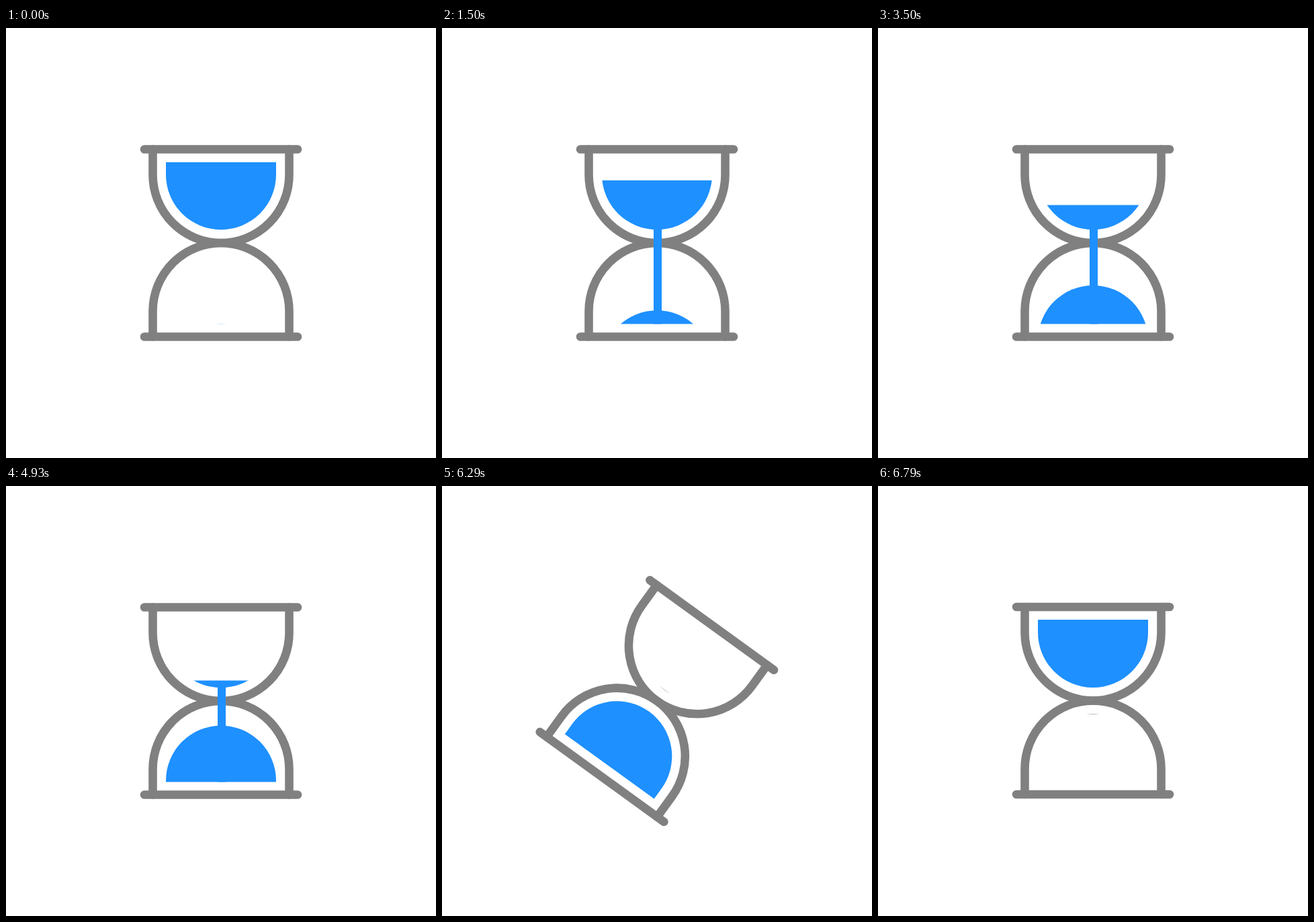
These frames come from a looping animation (640x640 px, 8 s). An HTML page:

```html
<!DOCTYPE html>
<html lang="en">
<head>
<meta charset="utf-8">
<title>Hourglass</title>
<style>
  html, body { margin: 0; width: 100%; height: 100%; overflow: hidden; background: #fff; }
  svg { display: block; width: 100%; height: 100%; }
  .glass { fill: none; stroke: #808080; stroke-width: 12.6; stroke-linecap: round; }
  .sand { fill: #1e90ff; }
</style>
</head>
<body>
<svg viewBox="0 0 640 640">
  <defs>
    <clipPath id="above"><rect id="level" x="230" y="199.4" width="180" height="110"/></clipPath>
    <clipPath id="below"><rect x="230" y="330" width="180" height="110.5"/></clipPath>
  </defs>
  <g id="hourglass">
    <g class="glass">
      <path d="M206 180.5H434M206 459.5H434"/>
      <path d="M218.5 180.5V218.5A101.5 101.5 0 0 0 421.5 218.5V180.5"/>
      <path d="M218.5 459.5V421.5A101.5 101.5 0 0 1 421.5 421.5V459.5"/>
    </g>
    <g class="sand">
      <g clip-path="url(#above)">
        <path id="upper" d="M238 199.4H402V218.2A82 82 0 0 1 238 218.2Z"/>
      </g>
      <rect id="stream" x="315" width="12"/>
      <g clip-path="url(#below)">
        <path id="pile" d="M238 440.5V421.5A82 82 0 0 1 402 421.5V440.5Z"/>
      </g>
    </g>
  </g>
</svg>
<script>
const LOOP = 8000, FRAME = 1000 / 14;
const DRAIN_END = 5490, FALL = 400, FILL_END = 5850;
const TURN_START = 6170, TURN_END = 6750;

const [hourglass, level, upper, stream, pile] =
  ['hourglass', 'level', 'upper', 'stream', 'pile'].map(id => document.getElementById(id));

const ramp = (t, start, end, from, to) =>
  from + (to - from) * Math.min(1, Math.max(0, (t - start) / (end - start)));

function draw(t) {
  level.setAttribute('y', ramp(t, 0, DRAIN_END, 199.4, 299.8));
  // The last thin trace left in the top bulb is grey.
  upper.style.fill = t >= DRAIN_END ? '#808080' : '';

  const head = ramp(t, 0, FALL, 299, 440.5);
  const tail = ramp(t, DRAIN_END, DRAIN_END + FALL, 299, 440.5);
  stream.setAttribute('y', tail);
  stream.setAttribute('height', head - tail);

  pile.setAttribute('transform', `translate(0 ${ramp(t, FALL, FILL_END, 101, 0)})`);
  hourglass.setAttribute('transform',
    `rotate(${ramp(t, TURN_START, TURN_END, 0, 180)} 320 319.75)`);
}

const begin = performance.now();
function tick(now) {
  const t = Math.max(0, now - begin) % LOOP;
  draw(Math.floor((t + 5) / FRAME) % 112 * FRAME);
  requestAnimationFrame(tick);
}
draw(0);
requestAnimationFrame(tick);
</script>
</body>
</html>
```
